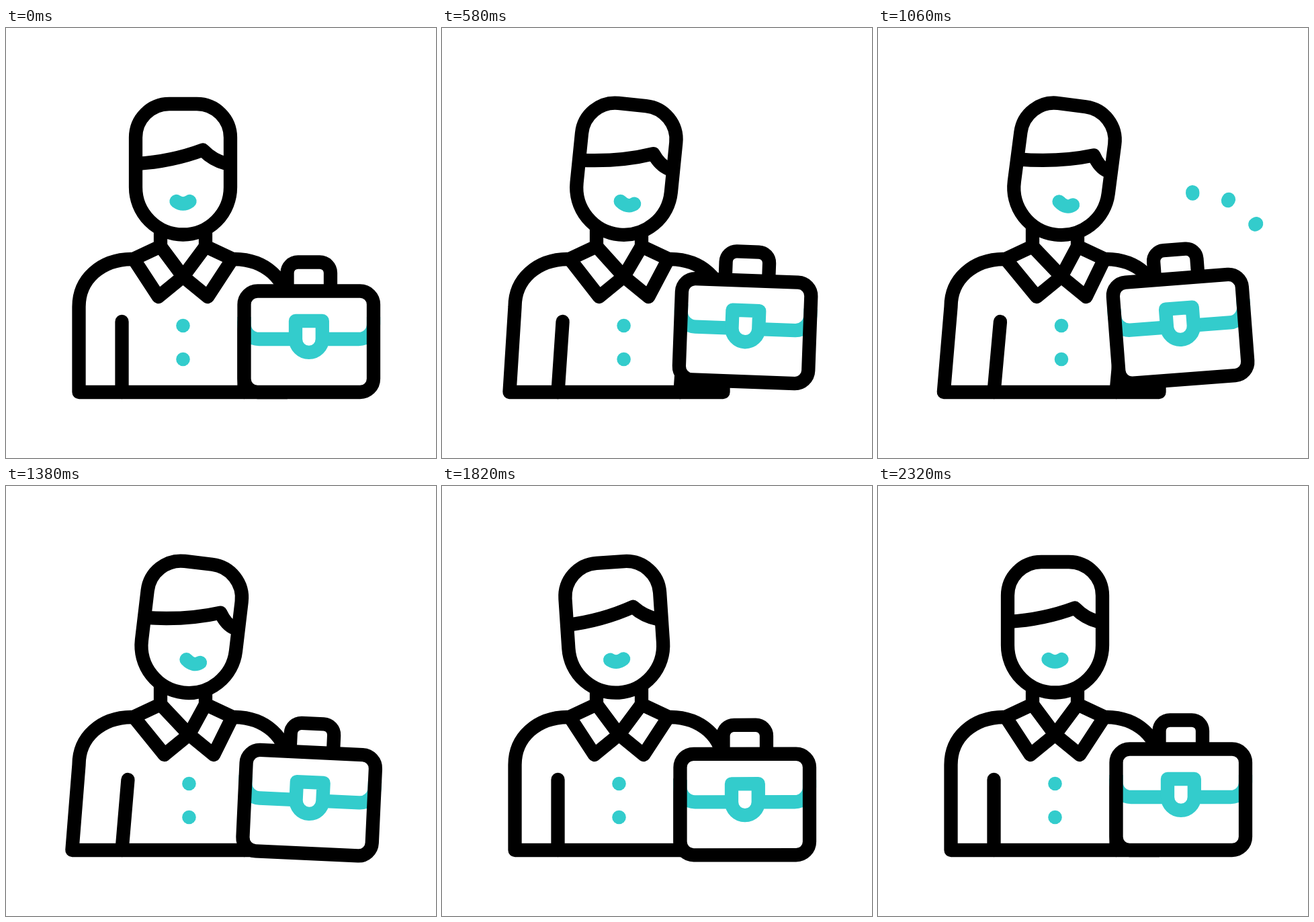
Animation, 640 px wide and 640 px high, one loop 2.4 s. Source, as an HTML page with a canvas:

```html
<!DOCTYPE html>
<html lang="en">
<head>
<meta charset="utf-8">
<title>Businessman with briefcase</title>
<style>
  html, body { margin: 0; width: 100%; height: 100%; overflow: hidden; background: #fff; }
  canvas { display: block; width: 100vw; height: 100vh; }
</style>
</head>
<body>
<canvas id="stage" width="640" height="640"></canvas>
<script>
const ctx = document.getElementById('stage').getContext('2d');
const LOOP = 2400, LINE = 20.3, MID = 263.5;
const BLACK = '#000', TEAL = '#33cccc', WHITE = '#fff';

// Eased progress from 0 to 1 between two times
function span(t, from, to) {
  const u = Math.min(1, Math.max(0, (t - from) / (to - from)));
  return (1 - Math.cos(Math.PI * u)) / 2;
}

// Sideways lean of the torso and face: half way, pause, further, back
const lean = t => 7.1 * span(t, 110, 500) + 3.5 * span(t, 760, 1250) - 10.6 * span(t, 1270, 1700);

// Head tilt in degrees: follows the lean, then sways past upright and settles
const tilt = t => 5.75 * span(t, 110, 500) + 2.45 * span(t, 760, 1250)
  - 13.6 * span(t, 1290, 1720) + 8.7 * span(t, 1720, 2080) - 3.3 * span(t, 2080, 2320);

// Case swing in degrees: one pull, then a damped oscillation
function swing(t) {
  const after = Math.max(0, t - 400);
  const wave = Math.exp(-after / 670) * Math.cos(Math.PI * after / 316);
  return -12.2 * span(t, 110, 400) * wave * (1 - span(t, 2060, 2260));
}

// Case height: up, drop below the rest position, back
const lift = t => -19 * span(t, 110, 760) + 32 * span(t, 1095, 1525) - 13 * span(t, 1530, 2160);

function stroke(d, color = BLACK, cap = 'butt') {
  ctx.strokeStyle = color;
  ctx.lineCap = cap;
  ctx.stroke(new Path2D(d));
}

// White shape with a black outline; the inner details go under the outline
function panel(x, y, w, h, radii, drawInside) {
  const path = new Path2D();
  path.roundRect(x, y, w, h, radii);
  ctx.fillStyle = WHITE;
  ctx.fill(path);
  drawInside();
  ctx.strokeStyle = BLACK;
  ctx.stroke(path);
}

function dot(x, y) {
  ctx.fillStyle = TEAL;
  ctx.beginPath();
  ctx.arc(x, y, 10.3, 0, Math.PI * 2);
  ctx.fill();
}

function rotated(x, y, degrees, draw) {
  ctx.save();
  ctx.translate(x, y);
  ctx.rotate(degrees * Math.PI / 180);
  ctx.translate(-x, -y);
  draw();
  ctx.restore();
}

function drawBody(p) {
  stroke(`M187 344 C141 344.5 108.5 374 108.5 415 L${108.5 - 1.13 * p} 542
    H418.5 V415 C418.5 374 386 344.5 340 344`);
  for (const side of [-1, 1]) {
    const x = offset => MID + side * offset;
    stroke(`M${x(91)} 542 L${x(91) + p} 437`, BLACK, 'round');
    stroke(`M${x(33.5)} 298 V325`);
    stroke(`M${x(73.5)} 343.7 L${x(36.7) + p} 400 L${MID + p} 370 L${x(33.5)} 325 Z`);
  }
  dot(MID + p, 443);
  dot(MID + p, 493);
}

function drawHead(p) {
  panel(193, 113, 141, 194.5, [50, 50, 70.5, 70.5], () => {
    const sink = 0.15 * p;
    stroke(`M194 ${202 + sink} Q${246 + p} ${199 + sink} ${293 + 1.3 * p} ${181.5 + sink}
      Q${308 + 0.8 * p} ${197 + 2 * sink} 328 ${202 + sink}`);
  });
  stroke(`M${253.5 + p} 258 Q${MID + 1.2 * p} ${265 + 0.3 * p} ${273.5 + 1.1 * p} ${258 + 0.24 * p}`, TEAL, 'round');
}

function drawCase() {
  stroke('M418.5 391 V364.5 A16 16 0 0 1 434.5 348.5 H467 A16 16 0 0 1 483 364.5 V391');
  panel(354.5, 391.5, 192.5, 150.5, 20, () =>
    stroke('M354.5 430 V441 A22 22 0 0 0 376.5 463 H525 A22 22 0 0 0 547 441 V430', TEAL));
  const clasp = 'M431 436 H470.8 V463 A19.9 19.9 0 0 1 431 463 Z';
  ctx.fill(new Path2D(clasp));
  stroke(clasp, TEAL);
}

// Three rays that fan out from one point, grow outwards and vanish outwards
function drawSparks(t) {
  const inner = 80 + 26 * span(t, 900, 1100), outer = 80 + 26 * span(t, 620, 760);
  if (outer <= inner) return;
  for (let i = 0; i < 3; i++) {
    const angle = (30 * i - 93.7) * Math.PI / 180;
    const at = r => `${475 + r * Math.cos(angle)} ${350 + r * Math.sin(angle)}`;
    stroke(`M${at(inner)} L${at(outer)}`, TEAL, 'round');
  }
}

function drawScene(t) {
  const p = lean(t);
  ctx.fillStyle = WHITE;
  ctx.fillRect(0, 0, 640, 640);
  ctx.lineWidth = LINE;
  ctx.lineJoin = 'round';

  drawBody(p);
  rotated(MID, 309, tilt(t), () => drawHead(p));

  ctx.save();
  ctx.translate(0, lift(t));
  rotated(450.75, 476, swing(t), drawCase);
  ctx.restore();

  drawSparks(t);
}

const start = performance.now();
function tick() {
  drawScene((performance.now() - start) % LOOP);
  requestAnimationFrame(tick);
}
tick();
</script>
</body>
</html>
```
